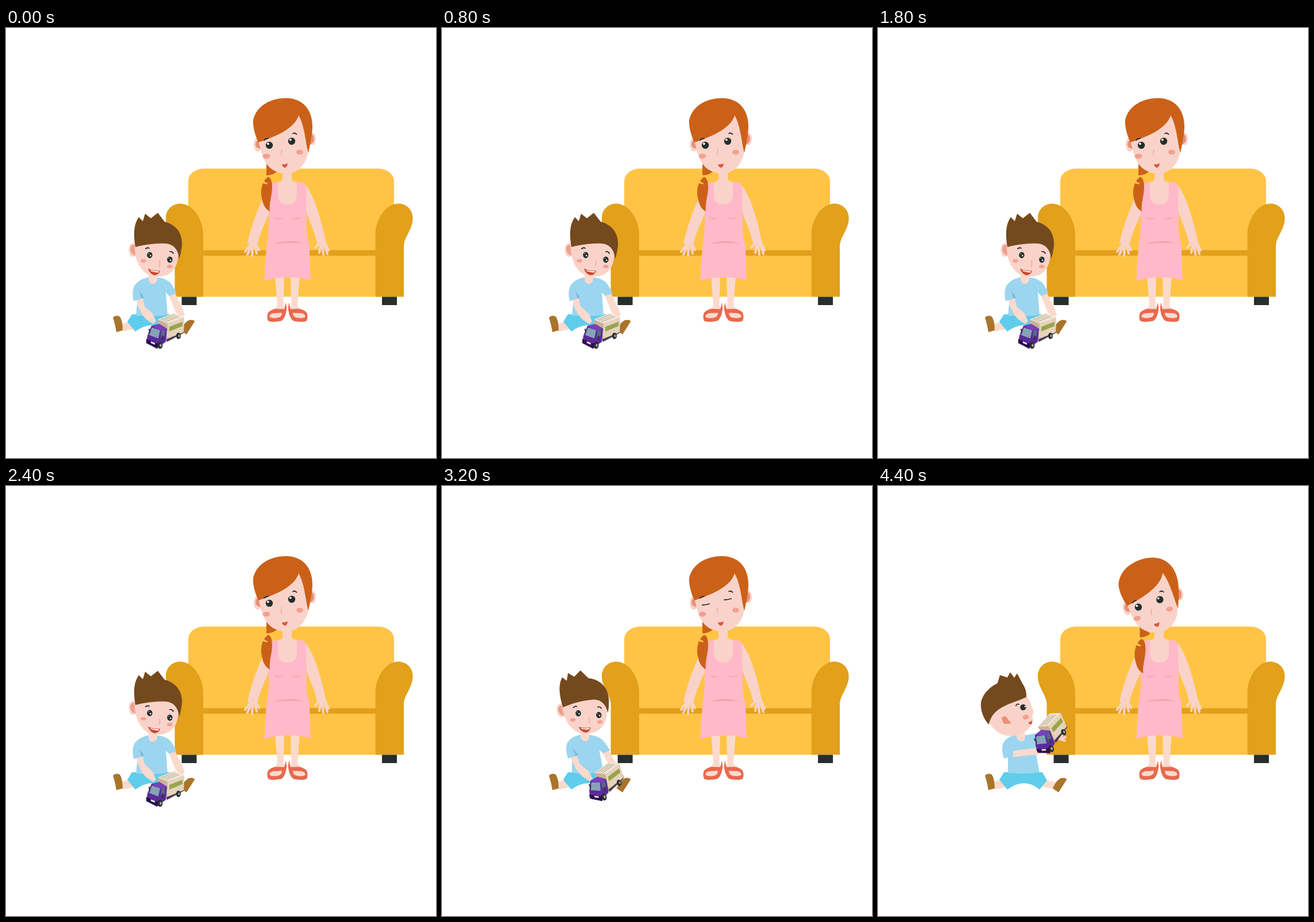
An HTML page for the animation above (5.6 s loop, 748 by 748 pixels).

```html
<!DOCTYPE html>
<html lang="en">
<head>
<meta charset="utf-8">
<title>Boy, truck and mother</title>
<style>
html, body { margin: 0; height: 100%; overflow: hidden; background: #fff; }
svg { display: block; width: 100vw; height: 100vh; }
.skin { fill: #f9d3c9; }
.pale { fill: #fbdacd; }
.hair { fill: #cb6118; }
.brown { fill: #74491e; }
.arm { fill: #e2a01b; }
.seat { fill: #ffc446; }
.dark { fill: #262f2d; }
.pink { fill: #ffb9c9; }
.fold { fill: #f0a3b1; }
.ear { fill: #ea9078; }
.blush { fill: #f3a090; }
.red { fill: #dd5540; }
.sandal { fill: #e9694e; }
.shirt { fill: #9cd5ef; }
.pants { fill: #5fcdeb; }
.shoe { fill: #a9742b; }
.white { fill: #fff; }
.line { fill: none; stroke: #262f2d; stroke-width: 1.8; stroke-linecap: round; }
.nose { fill: none; stroke: #ee9c8c; stroke-width: 1.1; stroke-linecap: round; }
.finger { fill: none; stroke: #f9d3c9; stroke-width: 4; stroke-linecap: round; stroke-linejoin: round; }
</style>
</head>
<body>
<svg viewBox="0 0 748 748">
  <defs>
    <g id="sofaSide">
      <path class="arm" d="M293.600 467.600V378C292 362 278 350 278 331C278 315 290 305.500 303 305.500C325 305.500 343 332 343 360V467.600Z"/>
      <path class="dark" d="M305.600 467.600h26v14.400h-26z"/>
    </g>
    <g id="leg">
      <path class="pale" d="M468 430H484L482.500 482L486 490L464 492L472 483Z"/>
      <path class="sandal" d="M486 477.500Q488.500 482 488 490Q486 505 479 509.500Q462 513 456 509.500Q453 502 456 495Q462 489 470 488.500L484 489Q486 484 486 477.500Z"/>
      <path class="pale" d="M458 502Q459 496.500 467 496L480 495.500Q480 503 473 504Q462 506 458 502Z"/>
    </g>
    <g id="eye"><circle class="dark" r="6.2"/><circle class="white" cx="-2.2" cy="-2.6" r="1.9"/></g>
    <g id="boyEye"><ellipse class="dark" rx="4.700" ry="5.400"/><circle class="white" cx="1.300" cy="1" r="1.300"/><circle class="white" cx="-1.500" cy="-2.500" r=".7"/></g>
  </defs>

  <g id="sofa">
    <rect class="seat" x="317" y="244.500" width="358" height="210" rx="27" ry="22"/>
    <path class="seat" d="M317 400H675V467.600H317Z"/>
    <path class="arm" d="M343 386.500H643V396H343Z"/>
    <use href="#sofaSide"/>
    <use href="#sofaSide" transform="matrix(-1 0 0 1 985.600 0)"/>
  </g>

  <g id="mom">
    <use href="#leg"/>
    <use href="#leg" transform="matrix(-1 0 0 1 979 0)"/>
    <path class="skin" d="M462 272C448 288 429 334 420 375L437 377C443 352 452 337 460 316ZM517 270C532 280 547 326 556 370L541 374C536 350 524 330 521 314Z"/>
    <path class="finger" d="M425 377L416 389M427 379L420 394M429 379L428 396M433 378L436 392M435 376L440 386M427 377H433M546 373L538 382M548 374L545 391M550 374L552 394M553 373L559 393M554 371L561 387M546 373H552"/>
    <path class="skin" d="M481 243H497V264Q500 267 510 269V310H468V269Q479 268 481 264Z"/>
    <path class="pink" d="M462 270L473 268V289C473 301 479 307 489 307C500 307 506 301 506 289V268L517 269Q522 270 522 282L523 340Q522 360 528 378L529 427Q529 434 532 439Q490 428 447 440Q452 432 450 423L453 380C459 350 456 328 457 310Z"/>
    <path class="fold" d="M464 328Q473 333 483 330Q474 337 464 328ZM496 330Q506 333 515 328Q505 337 496 330ZM465 376Q491 366 519 375Q491 372 465 376Z"/>
    <g id="tail" class="hair">
      <path d="M453 232L471 250Q462 257 453 256Z"/>
      <path d="M456 259Q451 262 449 267L455 270L454 272L447 270C443 280 443 290 446 300C448 310 453 316 459 319C457 306 463 291 463 277C463 268 461 260 456 259Z"/>
    </g>
    <g id="momHead">
      <ellipse class="skin" cx="438" cy="203" rx="7" ry="12"/>
      <path class="ear" d="M440 195Q433 196 434 204Q437 211 444 210Z"/>
      <ellipse class="skin" cx="533" cy="193" rx="6" ry="11"/>
      <path class="ear" d="M530 184Q536 185 536 193Q535 201 528 203Z"/>
      <path class="skin" d="M438 190C442 208 444 221 451 233C460 248 474 253 490 253C510 251 524 235 526 212L526 180L509 145Z"/>
      <path class="hair" d="M439 199C433 186 429 171 430 160C436 134 462 122 487 122C516 122 534 142 533 174C532 190 529 203 526 217C521 200 520 171 509 152C502 177 462 191 439 199Z"/>
      <g id="momOpen">
        <use href="#eye" x="458" y="204"/><use href="#eye" x="497" y="197"/>
      </g>
      <path id="momShut" class="line" d="M453 207Q459 207 465 205M491 198Q497 198 503 196"/>
      <path class="line" d="M449 195Q452 192 456 192M499 183.500Q503 181.500 505.500 185"/>
      <ellipse class="blush" cx="453" cy="223" rx="6.300" ry="4.300"/>
      <ellipse class="blush" cx="511" cy="216" rx="6" ry="4.300"/>
      <path class="nose" d="M480 211Q477 221 480 222"/>
      <path class="red" d="M480 237Q485 238 490 235.500Q489 243 485 243Q481 242 480 237Z"/>
    </g>
  </g>

  <g id="boy">
    <path class="pale" d="M202 514L216 511L222 524L203 528ZM290 511L311 516L305 527L282 522Z"/>
    <path class="shoe" d="M186 504Q191 498 198 502Q203 510 203 526L192 529Q190 515 186 504ZM328 511L314 533L304 526Q310 511 319 508Q328 507 328 511Z"/>
    <path class="pants" d="M219 498H286L294 512L281 528Q255 506 225 528L211 511Z"/>
    <g id="torso">
      <g id="armRight"><path class="pale" d="M283 465L294 461L308 490L311 499L305 503L295 494Z"/></g>
      <path class="shirt" d="M246 434H265Q281 436 288 446L297 461L284 466L278 460L281 499Q255 503 226 500L229 473L222 475Q218 458 224 447Q232 437 246 434Z"/>
      <path class="pale" d="M248 426H263V437Q262 445 255 445Q248 444 248 437Z"/>
      <path d="M232 457L240 468L236 473Z" fill="#80bad8"/>
      <g id="armLeft"><path class="pale" d="M227 474L238 470L241 484L256 498L261 511L256 515L243 506Q231 492 227 474Z"/></g>
    </g>
    <g id="reachLow">
      <path class="shirt" d="M260 433Q280 432 293 439L288 466L276 470Z"/>
      <path class="pale" d="M221 477L236 471Q245 479 269 480L273 493Q263 497 251 493Q231 490 221 477Z"/>
      <path class="finger" d="M314 462L323 451M315 461L327 457M315 462L326 464"/>
    </g>
    <g id="reachHigh">
      <path class="shirt" d="M260 433L282 429L288 450L276 460ZM217 450L236 448L245 463L232 474Z"/>
      <path class="pale" d="M235 461Q258 457 281 456L286 465L276 468Q255 468 235 472Z"/>
      <path class="finger" d="M314 440L324 430M315 440L326 437M315 440L325 443"/>
    </g>
    <g id="front">
      <ellipse class="skin" cx="221" cy="386" rx="7.500" ry="12"/>
      <path class="ear" d="M223 377Q216 377 216 385Q217 394 226 396Z" opacity=".75"/>
      <path class="skin" d="M224 377C223 400 231 420 247 429C265 437 288 432 296 413Q301 400 300 384L280 368Z"/>
      <path class="brown" d="M225 381C222 362 221 343 231 329L238 336L242 323L252 331L264 321.500L276 337C299 343 310 362 305 386Q304 394 301 402C300 386 292 376 278 375C260 374 240 377 225 381Z"/>
      <g id="frontOpen">
        <use href="#boyEye" x="250" y="395"/>
        <use href="#boyEye" x="285" y="403"/>
      </g>
      <path id="frontShut" class="line" d="M245 397Q250 398 255 396M280 405Q285 406 290 404"/>
      <path class="line" d="M243 384Q246 381 249 383M285 389Q289 388 291 392"/>
      <ellipse class="blush" cx="239" cy="405" rx="5" ry="3"/>
      <ellipse class="blush" cx="285" cy="415" rx="4.800" ry="3"/>
      <path class="nose" d="M267 405Q269 411 266 415"/>
      <path d="M247 418.500Q257 423 268 422Q266 430 258 430Q250 428 247 418.500Z" fill="#c84a30"/>
      <path class="white" d="M251 421Q258 423.500 266 423L265 425.500Q258 425 252 423Z"/>
    </g>
    <g id="side">
      <path class="skin" d="M193 410C196 380 230 368 257 364Q265 373 267 384Q272 391 270 396Q267 400 270 407L267 415Q261 426 249 431C230 440 205 434 193 410Z"/>
      <path class="brown" d="M193 415C180 402 176 381 181 370C187 355 200 347 208 343L212 329L225 333L230 324L237 333.500L242 326L251 343Q259 355 258 367C235 379 199 382 193 415Z"/>
      <path class="ear" d="M215 403Q222 397 226 406L232 412Q220 417 217 410Z"/>
      <g id="sideOpen">
        <circle class="dark" cx="252.500" cy="385" r="5.200"/>
        <circle class="white" cx="256" cy="383.500" r="1.300"/>
      </g>
      <path id="sideShut" class="line" d="M248 387Q253 388 258 385"/>
      <path class="line" d="M240 382Q242 378 245 380"/>
      <ellipse class="blush" cx="257" cy="402" rx="5.500" ry="4" transform="rotate(-18 257 402)"/>
      <path class="red" d="M261 412L268 408Q269 414 265 415Z"/>
    </g>
  </g>

  <g id="truck">
    <path d="M277 538L310 523V530L280 546Z" fill="#463c50"/>
    <path d="M264 507L281 514L280 542L265 534Z" fill="#cdb193"/>
    <path d="M281 514L310 503L309.500 529L280 541Z" fill="#e6d3ba"/>
    <path d="M264 507L293 495.500L310 503L281 514Z" fill="#f0e6d5"/>
    <path d="M269 507.500L293 498.500M273 509L297 500.500M277 511L301 502" stroke="#b9aa96" stroke-width="1.200"/>
    <path d="M284 520L307 511V518.500L284 528Z" fill="#98a44e"/>
    <path d="M253 518L267 515L280 523L278 546L262 557L244 548L246 535Z" fill="#5b2a9b"/>
    <path d="M253 518L267 515L280 523L268 527Z" fill="#7542b8"/>
    <path d="M254 521L268 526L265 540L249 534Z" fill="#86a3b5"/>
    <path d="M270 527L277 524.500L276 535L269 539Z" fill="#536a84"/>
    <path d="M244 541L262 549L270 545L263 558L244 548Z" fill="#2c0d50"/>
    <path d="M252 545L259 548V551L252 548Z" fill="#eee"/>
    <path class="line" d="M249 524L250 530M272 536L273 542"/>
    <g class="dark">
      <ellipse cx="268" cy="552" rx="4.500" ry="6"/>
      <ellipse cx="300" cy="535.500" rx="4" ry="5.500"/>
    </g>
    <g fill="#aaa6ae">
      <ellipse cx="269" cy="552" rx="1.700" ry="2.800"/>
      <ellipse cx="301" cy="535.500" rx="1.500" ry="2.500"/>
    </g>
  </g>
</svg>
<script>
const STEP = 200, LOOP = 5600;
const el = id => document.getElementById(id);
const show = (id, on) => el(id).style.display = on ? '' : 'none';
const move = (id, t) => el(id).setAttribute('transform', t || '');
const shift = (x, y, turn, cx, cy) => `translate(${x} ${y}) rotate(${turn} ${cx} ${cy})`;
const headAt = (x, y, turn) => shift(x, y, turn, 258, 424);
const truckAt = (x, y, turn) => shift(x, y, turn, 284, 543.5);

const rest = {};
const push = { momShut: 1, head: headAt(1, 0, 3), truck: truckAt(3, -5, -5) };
const pull = { boyShut: 1, arms: 'translate(-3 3)', truck: truckAt(-7, 6, 0) };
const play = [rest, push, rest, pull, rest];
const lift = { side: 1, lean: 1, reach: 'reachLow', truck: truckAt(22.5, -60.5, -24) };
const offer = { side: 1, lean: 1, reach: 'reachHigh', truck: truckAt(28, -101, -26), tilt: 1 };
const story = [
  ...play, ...play, ...play,
  { head: headAt(1, 0, 3) },
  { momShut: 1, lean: 1, head: headAt(-9, -1, -8), truck: truckAt(11, -15, -16) },
  { lean: 1, head: headAt(-16, 1, -14), reach: 'reachLow', truck: truckAt(18, -45, -21) },
  { ...lift, turn: shift(-6, 0, -8, 247, 437) },
  lift,
  offer,
  { ...offer, momShut: 1, boyShut: 1 },
  offer
];

function draw(p) {
  for (const who of ['mom', 'front', 'side']) {
    const shut = who == 'mom' ? p.momShut : p.boyShut;
    show(who + 'Open', !shut);
    show(who + 'Shut', shut);
  }
  show('front', !p.side);
  show('side', p.side);
  for (const id of ['reachLow', 'reachHigh']) show(id, p.reach == id);
  for (const id of ['armLeft', 'armRight']) {
    show(id, !p.reach);
    move(id, p.arms);
  }
  move('torso', p.lean && 'matrix(1 0 .11 1 -55 -1)');
  move('front', p.head);
  move('side', p.turn);
  move('truck', p.truck);
  move('momHead', p.tilt && shift(0, 2, -9, 485, 239));
  move('tail', p.tilt && 'translate(2.5 7)');
}

const start = performance.now();
function tick() {
  const i = Math.floor((performance.now() - start) % LOOP / STEP);
  draw(story[Math.min(i, story.length - 1)]);
  requestAnimationFrame(tick);
}
tick();
</script>
</body>
</html>
```
